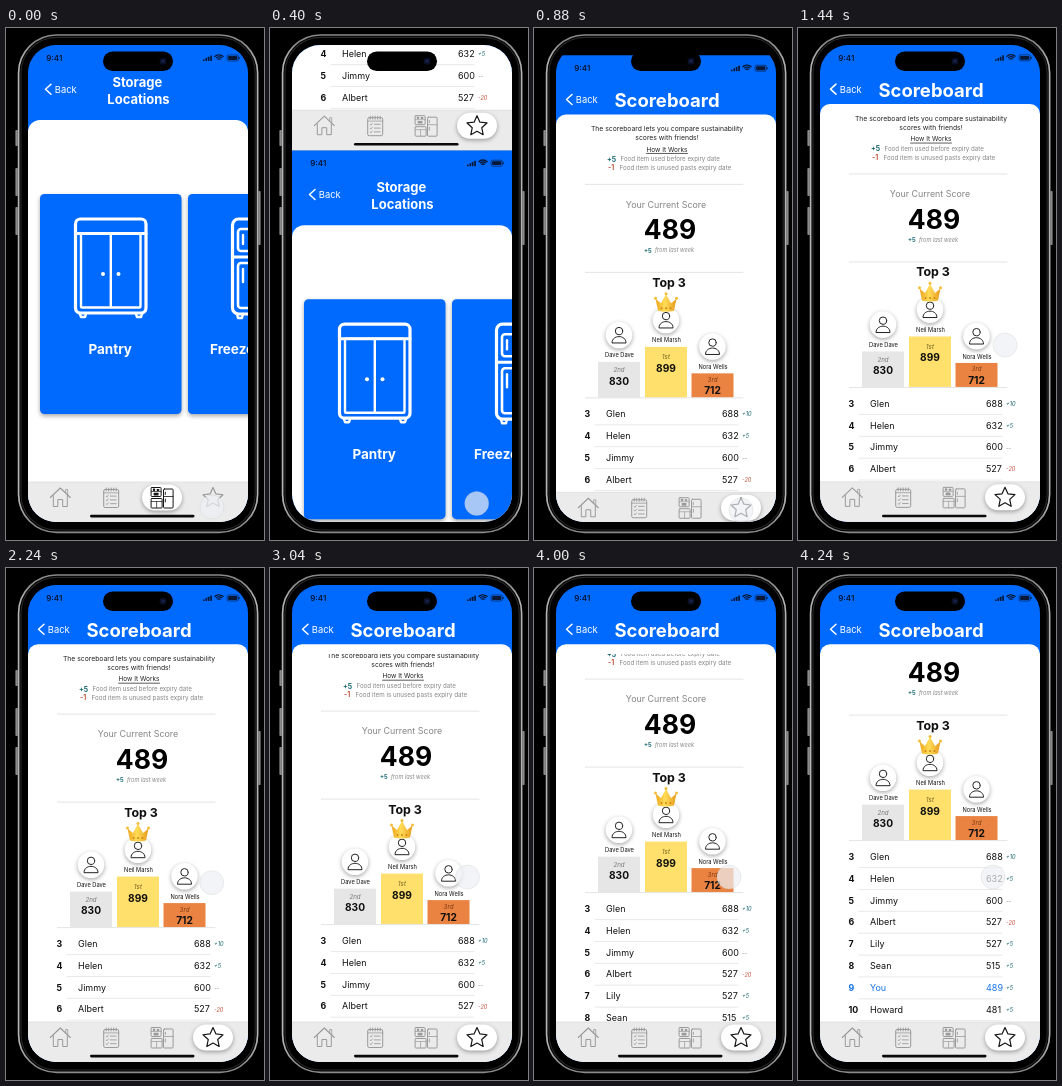
An HTML page with a canvas for the animation above (4320 ms loop, 258 by 512 pixels).

```html
<!DOCTYPE html>
<html lang="en">
<head>
<meta charset="utf-8">
<title>Scoreboard prototype</title>
<style>
html, body { margin: 0; width: 100%; height: 100%; overflow: hidden; background: #000; }
canvas { display: block; width: 258px; height: 512px; }
</style>
</head>
<body>
<canvas id="stage"></canvas>
<script>
const W = 258, H = 512, LOOP = 4320, STEP = 80;
const SCREEN = { x: 22, y: 17, w: 220, h: 477, r: 28 };
const BLUE = '#006afe', TEAL = '#17666f', RED = '#c4553f', GRAY = '#858585', INK = '#101010';
const canvas = document.getElementById('stage');
const dpr = window.devicePixelRatio || 1;
canvas.width = W * dpr;
canvas.height = H * dpr;
const c = canvas.getContext('2d');

const podium = [
  { x: 85, top: 323, fill: '#e6e6e6', place: '2nd', score: '830', name: 'Dave Dave', ink: '#777', gap: 8 },
  { x: 132, top: 308, fill: '#ffe06c', place: '1st', score: '899', name: 'Neil Marsh', ink: '#6b5b1c', gap: 10.3 },
  { x: 178.5, top: 334.5, fill: '#ea8241', place: '3rd', score: '712', name: 'Nora Wells', ink: '#7c3c14', gap: 6.2 }
];
const ranks = [
  ['Glen', 688, '+10'], ['Helen', 632, '+5'], ['Jimmy', 600, '--'], ['Albert', 527, '-20'],
  ['Lily', 527, '+5'], ['Sean', 515, '+5'], ['You', 489, '+5'], ['Howard', 481, '+5']
];

function text(str, x, y, size, color, style = '', align = 'center') {
  c.font = `${style} ${size}px Inter, "Liberation Sans", sans-serif`;
  c.textAlign = align;
  c.textBaseline = 'alphabetic';
  c.fillStyle = color;
  c.fillText(str, x, y + size * 0.363);
}

function box(x, y, w, h, r, fill, stroke, line = 1) {
  c.beginPath();
  c.roundRect(x, y, w, h, r);
  if (fill) { c.fillStyle = fill; c.fill(); }
  if (stroke) { c.strokeStyle = stroke; c.lineWidth = line; c.stroke(); }
}

function disc(x, y, r, fill, stroke, line = 1) {
  c.beginPath();
  c.arc(x, y, r, 0, Math.PI * 2);
  if (fill) { c.fillStyle = fill; c.fill(); }
  if (stroke) { c.strokeStyle = stroke; c.lineWidth = line; c.stroke(); }
}

function path(points, color, line, closed = false) {
  c.beginPath();
  for (let i = 0; i < points.length; i += 2) c.lineTo(points[i], points[i + 1]);
  if (closed) c.closePath();
  c.strokeStyle = color;
  c.lineWidth = line;
  c.stroke();
}

function rule(y, x0 = 51, x1 = 209, color = '#dedede') {
  path([x0, y, x1, y], color, 0.8);
}

function shadowed(draw, blur = 4, dy = 1.5, alpha = 0.35) {
  c.save();
  c.shadowColor = `rgba(0,0,0,${alpha})`;
  c.shadowBlur = blur * dpr;
  c.shadowOffsetY = dy * dpr;
  draw();
  c.restore();
}

function at(x, y, draw) {
  c.save();
  c.translate(x, y);
  draw();
  c.restore();
}

function fillScreen() {
  c.fillStyle = BLUE;
  c.fillRect(SCREEN.x, SCREEN.y, SCREEN.w, SCREEN.h);
}

function statusBar(ink) {
  text('9:41', 48.2, 30, 8, ink, '600');
  for (let i = 0; i < 4; i++) box(197 + i * 2.4, 31.4 - i * 1.3, 1.7, 1.6 + i * 1.3, 0.4, ink);
  c.lineCap = 'butt';
  for (const r of [2.2, 4.2, 6.2]) {
    c.beginPath();
    c.arc(213, 33, r, -Math.PI * 0.76, -Math.PI * 0.24);
    c.strokeStyle = ink;
    c.lineWidth = 1.3;
    c.stroke();
  }
  box(221, 27, 11.5, 6, 1.8, null, ink, 0.6);
  box(222.1, 28.1, 9.3, 3.8, 1, ink);
  box(233.2, 29, 0.8, 2, 0.4, ink);
}

function back(x) {
  c.lineCap = c.lineJoin = 'round';
  path([x + 5.5, 56.3, x, 61.3, x + 5.5, 66.3], '#fff', 1.5);
  text('Back', x + 9.3, 61.3, 9.4, '#fff', '', 'left');
}

const icons = [
  ink => {
    path([-10, 0, 0, -9.5, 10, 0], ink, 1.1);
    path([-7, -2, -7, 9, -2.4, 9, -2.4, 2, 2.4, 2, 2.4, 9, 7, 9, 7, -2], ink, 1);
    path([5.4, -4.5, 5.4, -8, 7.4, -8, 7.4, -2.7], ink, 0.8);
  },
  ink => {
    box(-7.5, -8, 15, 18, 1.5, null, ink, 1);
    path([-7.5, -4.6, 7.5, -4.6], ink, 0.8);
    for (let i = 0; i < 5; i++) path([-5 + i * 2.5, -9.6, -5 + i * 2.5, -6.5], ink, 0.9);
    for (let y = -1.4; y < 8; y += 3.8) {
      path([-5.2, y, -4.3, y + 1, -2.8, y - 1], ink, 0.8);
      path([-1, y, 5, y], ink, 0.9);
    }
  },
  ink => {
    box(-11, -10, 10, 9, 0.8, null, ink, 1);
    path([-11, -6, -1, -6], ink, 0.7);
    box(-9.2, -9, 2.2, 2.4, 0.4, ink);
    box(-5.4, -8.6, 2.6, 2, 0.4, ink);
    box(-8.4, -4.8, 4.8, 2.7, 0.5, ink);
    box(-11, 1, 11, 9.5, 0.8, null, ink, 1);
    path([-11, 4, 0, 4], ink, 0.7);
    path([-5.5, 4, -5.5, 10], ink, 0.7);
    box(1.4, -8.5, 9.6, 19, 1, null, ink, 1);
    path([1.4, -1, 11, -1], ink, 0.8);
    path([3.2, -5.5, 3.2, -3], ink, 0.9);
    path([3.2, 1.4, 3.2, 4.5], ink, 0.9);
  },
  ink => {
    const pts = [];
    for (let i = 0; i < 10; i++) {
      const a = Math.PI * (i / 5 - 0.5), r = i % 2 ? 5 : 10.5;
      pts.push(Math.cos(a) * r, Math.sin(a) * r + 0.5);
    }
    path(pts, ink, 1.2, true);
  }
];

function navBar(active) {
  c.fillStyle = '#ebebeb';
  c.fillRect(22, 454, 220, SCREEN.y + SCREEN.h - 454);
  rule(454, 22, 242);
  c.lineCap = c.lineJoin = 'round';
  icons.forEach((icon, i) => {
    const on = i === active, x = 54.3 + i * 50.9;
    if (on) shadowed(() => box(x - 20, 456.5, 40, 26, 13, '#fff'));
    at(x, 469.5, () => icon(on ? '#161616' : '#9a9a9a'));
  });
  box(84, 486.8, 104.5, 2.6, 1.3, '#0a0a0a');
}

function wardrobe() {
  c.lineCap = c.lineJoin = 'round';
  box(69.5, 191, 70.5, 94, 5, null, '#fff', 3.2);
  path([70, 205.5, 140, 205.5], '#fff', 3);
  box(75, 205.5, 59.5, 74, 1, null, '#fff', 2.4);
  path([104.8, 206, 104.8, 279], '#fff', 2.4);
  for (const x of [97, 112.5]) disc(x, 246, 2, '#fff');
  for (const x of [74, 130]) path([x, 286, x + 1, 289, x + 5, 289, x + 6, 286], '#fff', 2.4);
}

function freezer() {
  c.lineCap = c.lineJoin = 'round';
  box(226.5, 191, 52, 95, 6, null, '#fff', 3.2);
  path([227, 229, 278, 229], '#fff', 3);
  box(232, 201, 22, 22, 3, null, '#fff', 2.6);
  box(232, 235, 22, 45, 3, null, '#fff', 2.6);
  path([237, 207, 237, 216], '#fff', 2.4);
  path([237, 241, 237, 254], '#fff', 2.4);
  path([231, 286, 232, 290, 236, 290, 237, 286], '#fff', 2.4);
}

function storagePage() {
  fillScreen();
  statusBar('#071735');
  back(39.5);
  text('Storage', 131.3, 54.5, 13, '#fff', '700');
  text('Locations', 132.5, 71, 13, '#fff', '700');
  box(22, 92, 220, 402, [12, 12, 0, 0], '#fff');
  for (const x of [34, 182]) shadowed(() => box(x, 166, 141.5, 220, 4.5, BLUE), 4, 2);
  wardrobe();
  freezer();
  text('Pantry', 104.2, 321, 13.5, '#fff', '700');
  text('Freezer Left', 204, 321, 13.5, '#fff', '700', 'left');
  navBar(2);
}

function avatar(x, y) {
  shadowed(() => disc(x, y, 13.3, '#fff'));
  disc(x, y - 4, 3.7, null, '#222', 1);
  c.beginPath();
  c.moveTo(x - 7, y + 7.5);
  c.bezierCurveTo(x - 7, y - 0.6, x + 7, y - 0.6, x + 7, y + 7.5);
  c.closePath();
  c.strokeStyle = '#222';
  c.stroke();
}

function crown(x, y) {
  at(x, y, () => {
    c.beginPath();
    c.moveTo(-8, 9);
    for (const [px, py] of [[-10.5, -3], [-5, 1.5], [0, -7.5], [5, 1.5], [10.5, -3], [8, 9]]) c.lineTo(px, py);
    c.quadraticCurveTo(0, 11, -8, 9);
    const g = c.createLinearGradient(-9, 0, 9, 0);
    g.addColorStop(0, '#f0ae25');
    g.addColorStop(0.45, '#ffdc57');
    g.addColorStop(1, '#e9a322');
    c.fillStyle = g;
    c.fill();
    for (const [px, py] of [[-10.5, -3.6], [0, -8.2], [10.5, -3.6]]) disc(px, py, 1.5, '#f3bd37');
    for (const px of [-4.5, 0, 4.5]) disc(px, 6.5, 1, '#c98517');
  });
}

function scoreContent() {
  text('The scoreboard lets you compare sustainability', 133, 90, 6.8, '#222');
  text('scores with friends!', 133, 99, 6.8, '#222');
  text('How It Works', 133, 110.5, 6.5, '#222');
  rule(114.6, 112.5, 153.5, '#333');
  text('+5', 73, 120.4, 7, TEAL, '700', 'left');
  text('Food item used before expiry date', 86.5, 120.4, 6.15, GRAY, '', 'left');
  text('-1', 74, 129, 7, RED, '700', 'left');
  text('Food item is unused pasts expiry date', 85.5, 129, 6.25, GRAY, '', 'left');
  rule(145.5);
  text('Your Current Score', 132, 165.5, 8.9, GRAY);
  text('489', 136, 191, 26.5, '#000', '700');
  text('+5', 110, 211.6, 5.9, TEAL, '700', 'left');
  text('from last week', 121, 211.6, 5.6, GRAY, 'italic', 'left');
  rule(233.5);
  text('Top 3', 135, 243.5, 12.4, INK, '700');
  for (const p of podium) {
    c.fillStyle = p.fill;
    c.fillRect(p.x - 21, p.top, 42, 358.5 - p.top);
    avatar(p.x, p.top - 26.8);
    text(p.name, p.x + 0.5, p.top - 6.5, 5.7, '#111');
    text(p.place, p.x, p.top + p.gap, 6.2, p.ink, 'italic');
    text(p.score, p.x, p.top + p.gap + 11, 10.2, INK, '700');
  }
  crown(132, 263);
  rule(359);
  ranks.forEach(([name, score, delta], i) => {
    const y = 375 + i * 21.87, me = name === 'You', ink = me ? '#1873e8' : INK;
    text(i + 3, 50.5, y, 8.8, ink, '700', 'left');
    text(name, 72, y, 9, ink, '', 'left');
    text(score, 188, y, 9, ink, '', 'left');
    const tint = delta === '--' ? GRAY : delta[0] === '-' ? RED : TEAL;
    text(delta, 208, y + 0.3, 5.6, tint, 'italic', 'left');
    rule(y + 11, 61, 204, '#e2e2e2');
  });
}

function scorePage(scroll) {
  fillScreen();
  statusBar('#071735');
  back(32.5);
  text('Scoreboard', 133, 62.2, 18.5, '#fff', '700');
  box(22, 76.2, 220, 417.8, [10, 10, 0, 0], '#fff');
  c.save();
  c.beginPath();
  c.rect(22, 86, 220, 368);
  c.clip();
  c.translate(0, 0.6 - scroll);
  scoreContent();
  c.restore();
  navBar(3);
}

function phoneBody() {
  const g = c.createLinearGradient(12, 0, 252, 0);
  g.addColorStop(0, '#b4b4b4');
  g.addColorStop(0.06, '#8a8a8a');
  g.addColorStop(0.94, '#8a8a8a');
  g.addColorStop(1, '#b4b4b4');
  for (const [y, h] of [[102, 16], [140, 28], [179, 28]]) box(9.4, y, 2.4, h, 0.8, '#8a8a8a');
  box(252.4, 163, 2.2, 54, 0.8, '#8a8a8a');
  box(12.6, 7, 239, 497.4, 38, '#000', g, 1.7);
  box(15, 9.4, 234.2, 492.6, 35.6, null, '#262626', 1.2);
}

// Damped spring: mass 1, stiffness 100, damping 15.
function spring(s) {
  if (s <= 0) return 0;
  const w = Math.sqrt(100 - 7.5 * 7.5);
  return 1 - Math.exp(-7.5 * s) * (Math.cos(w * s) + 7.5 / w * Math.sin(w * s));
}

function track(keys, t) {
  let i = 1;
  while (i < keys.length - 1 && t > keys[i][0]) i++;
  const [t0, ...a] = keys[i - 1], [t1, ...b] = keys[i];
  const k = Math.min(1, Math.max(0, (t - t0) / (t1 - t0)));
  return a.map((v, n) => v + (b[n] - v) * k);
}

const scrollKeys = [[2880, 0], [3040, 3], [3680, 13], [4000, 35], [4240, 87]];
const touchKeys = [[0, 206, 479], [560, 207, 474], [880, 207, 482], [1440, 207, 317], [2800, 205, 313], [3040, 197.5, 309], [4000, 195, 309]];

function draw(t) {
  c.setTransform(dpr, 0, 0, dpr, 0, 0);
  c.fillStyle = '#000';
  c.fillRect(0, 0, W, H);
  phoneBody();
  c.save();
  c.beginPath();
  c.roundRect(SCREEN.x, SCREEN.y, SCREEN.w, SCREEN.h, SCREEN.r);
  c.clip();
  const push = spring((t - 318) / 1000) * SCREEN.h;
  if (push < SCREEN.h) at(0, push, storagePage);
  if (push > 0) at(0, push - SCREEN.h, () => scorePage(track(scrollKeys, t)[0]));
  const [x, y] = track(touchKeys, t);
  disc(x, y, 12, 'rgba(238,240,244,0.7)', 'rgba(190,190,195,0.35)', 0.7);
  c.restore();
  box(97, 23.5, 70, 19.5, 9.75, '#000');
  disc(157, 33.2, 3.4, '#0c1026');
  disc(157, 33.2, 1.4, '#1b2452');
}

const start = performance.now();
function tick() {
  const t = (performance.now() - start) % LOOP;
  draw(Math.floor(t / STEP) * STEP);
  requestAnimationFrame(tick);
}
tick();
</script>
</body>
</html>
```
